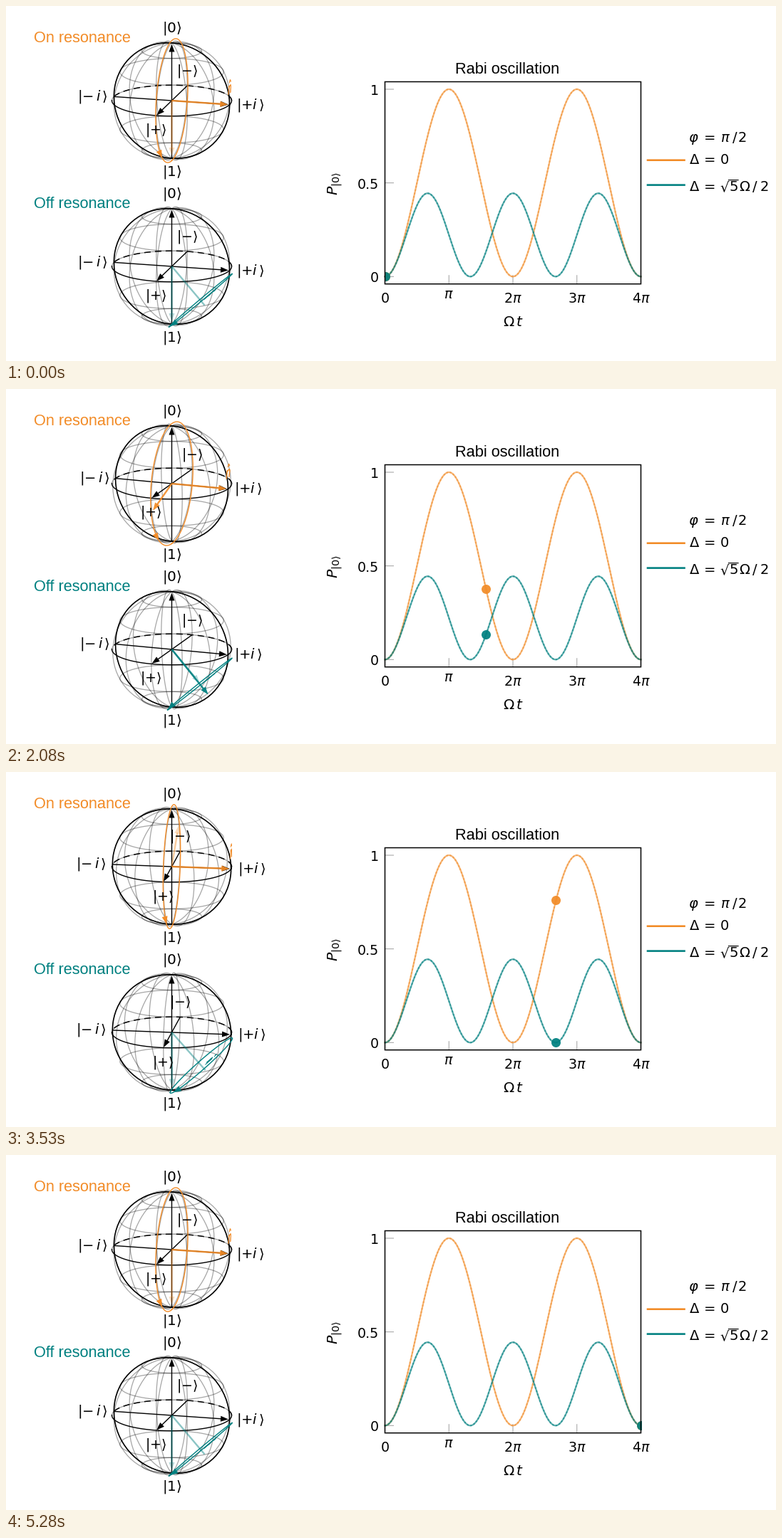
A matplotlib script that plays this animation: 1080x499 px, repeating every 5310 ms.

```python
import numpy as np
import matplotlib.pyplot as plt
from matplotlib.animation import FuncAnimation
from matplotlib.collections import LineCollection
from matplotlib.patches import PathPatch, Polygon, Rectangle
from matplotlib.path import Path
from matplotlib.textpath import TextPath

W, H = 1080, 499
STEPS, FRAMES, LOOP = 190, 192, 5310
PX = 0.72                      # points per pixel at 100 dpi
ORANGE, TEAL, BLACK = "#f28c28", "#008080", "black"
CX, R = 232.5, 84
TILT = np.radians(15)
CIRCLE = np.linspace(0, 2 * np.pi, 73)

fig = plt.figure(figsize=(W / 100, H / 100), dpi=100, facecolor="white")
ax = fig.add_axes([0, 0, 1, 1])
ax.set_xlim(0, W)
ax.set_ylim(H, 0)
ax.axis("off")


def label(x, y, s, size=20, color=BLACK, ha="center", va="center", **kw):
    return ax.text(x, y, s, fontsize=size * PX, color=color, ha=ha, va=va,
                   zorder=9, **kw)


def heading(x, y, s, color=BLACK):
    label(x, y, s, 21.8, color, "left", "baseline", family="Liberation Sans")


def stroke(x, y, color, width, **kw):
    return ax.plot(x, y, color=color, lw=width * PX, snap=False, **kw)[0]


def project(p, phi, cy):
    x, y, z = np.moveaxis(np.asarray(p, float), -1, 0)
    sx = -x * np.sin(phi) + y * np.cos(phi)
    near = x * np.cos(phi) + y * np.sin(phi)
    sy = near * np.sin(TILT) - z * np.cos(TILT)
    return np.stack([CX + R * sx, cy + R * sy], -1)


def depth(p, phi):
    near = p[0] * np.cos(phi) + p[1] * np.sin(phi)
    return near * np.cos(TILT) + p[2] * np.sin(TILT)


def head_points(tip, way, length=11, width=8):
    way = way / np.hypot(*way)
    side = np.array([-way[1], way[0]]) * width / 2
    base = tip - length * way
    return np.array([tip, base + side, base - side])


class Arrow:
    def __init__(self, color, width, z):
        self.line = stroke([], [], color, width, zorder=z, solid_capstyle="butt")
        self.head = Polygon(np.zeros((3, 2)), fc=color, ec="none", zorder=z)
        ax.add_patch(self.head)

    def place(self, start, tip, alpha=1.0, head_alpha=1.0):
        way = tip - start
        end = tip - way / np.hypot(*way) * 10
        self.line.set_data([start[0], end[0]], [start[1], end[1]])
        self.line.set_alpha(alpha)
        self.head.set_xy(head_points(tip, way))
        self.head.set_alpha(head_alpha)


def meridian(lon):
    c, s = np.cos(CIRCLE), np.sin(CIRCLE)
    return np.stack([c * np.cos(lon), c * np.sin(lon), s], -1)


def parallel(lat):
    ring = np.cos(lat)
    return np.stack([ring * np.cos(CIRCLE), ring * np.sin(CIRCLE),
                     np.full_like(CIRCLE, np.sin(lat))], -1)


GRID = [meridian(np.radians(d)) for d in range(0, 180, 30)]
GRID += [parallel(np.radians(d)) for d in (-60, -30, 30, 60)]
X, Y, Z = np.eye(3)

glyph = TextPath((0, 0), r"$\hat{n}$", size=100)
box = glyph.get_extents()
GLYPH = (glyph.vertices - [(box.x0 + box.x1) / 2, (box.y0 + box.y1) / 2]) / 100
GLYPH = GLYPH * [0.36, 0.25]


class Bloch:
    """Sphere with a state precessing about a tilted drive axis."""

    def __init__(self, cy, axis, color):
        self.cy, self.axis = cy, np.array(axis)
        self.mid = self.axis * (self.axis @ -Z)
        self.arm = -Z - self.mid
        self.turn = np.cross(self.axis, self.arm)
        up = -self.arm / np.linalg.norm(self.arm)
        self.sign = (self.axis + 0.31 * Z
                     + GLYPH[:, :1] * -X + GLYPH[:, 1:] * up)

        self.grid = LineCollection([], colors="black", alpha=0.34,
                                   linewidths=1.3 * PX, zorder=1)
        ax.add_collection(self.grid)
        a = np.linspace(0, np.pi, 60)
        ex, ey = CX + R * np.cos(a), R * np.sin(TILT) * np.sin(a)
        stroke(ex, cy - ey, "#999999", 1.2, zorder=2)
        stroke(ex, cy - ey, BLACK, 1.5, zorder=2, linestyle=(0, (6, 4)))
        stroke(ex, cy + ey, BLACK, 1.4, zorder=2)
        self.rim = stroke([], [], BLACK, 1.6, zorder=2)
        self.axes = [Arrow(BLACK, 1.4, 3) for _ in range(3)]
        self.orbit = stroke([], [], color, 1.4, zorder=4)
        self.orbit_head = Polygon(np.zeros((3, 2)), fc=color, ec="none", zorder=5)
        self.mark = PathPatch(Path(np.zeros((2, 2))), fc=color, ec=color,
                              lw=0.5 * PX, zorder=6)
        ax.add_patch(self.orbit_head)
        ax.add_patch(self.mark)
        self.drive = Arrow(color, 2.4, 5)
        self.state = Arrow(color, 2.4, 6)

        label(CX, cy - 102, r"$|0\rangle$")
        label(CX, cy + 100.5, r"$|1\rangle$")
        self.plus = label(0, 0, r"$|{+}\rangle$", 19)
        self.minus = label(0, 0, r"$|{-}\rangle$", 19)
        self.plus_i = label(0, 0, r"$|{+}i\,\rangle$", 19.5, ha="left")
        self.minus_i = label(0, 0, r"$|{-}\,i\,\rangle$", 19.5, ha="right")

    def at(self, angle, grow=1.0):
        c, s = np.cos(angle), np.sin(angle)
        return self.mid + grow * (np.multiply.outer(c, self.arm)
                                  + np.multiply.outer(s, self.turn))

    def vector(self, arrow, p, reach, phi, hidden_head):
        front = depth(p, phi) > 0
        look = (0.9, 0.95) if front else (0.45, hidden_head)
        arrow.place(np.array([CX, self.cy]),
                    project(p * reach, phi, self.cy), *look)

    def update(self, phi, angle):
        def flat(p):
            return project(p, phi, self.cy)

        self.grid.set_segments([flat(g) for g in GRID])
        self.rim.set_data(*flat(meridian(np.pi / 2)).T)
        for arrow, v in zip(self.axes, (X, Y, Z)):
            arrow.place(flat(-v), flat(v * 0.98))

        self.orbit.set_data(*flat(self.at(CIRCLE, 1.04)).T)
        tail, tip = flat(self.at(np.radians([-45, -37]), 1.04))
        self.orbit_head.set_xy(head_points(tip, tip - tail))
        self.mark.set_path(Path(flat(self.sign), glyph.codes))

        self.vector(self.drive, self.axis, 0.97, phi, 0)
        self.vector(self.state, self.at(angle), 0.95, phi, 0.3)

        self.plus.set_position(flat(X) + [-0.5, 20.5])
        self.minus.set_position(flat(-X) - [0, 20.5])
        self.plus_i.set_position(flat(Y) + [9, 0.5])
        self.minus_i.set_position(flat(-Y) - [8.5, 0])


# Population chart
LEFT, RIGHT, TOP, BOTTOM = 531.5, 890.5, 106.5, 390.7


def chart_x(t):
    return LEFT + (RIGHT - LEFT) * t / (4 * np.pi)


def chart_y(p):
    return 380.3 - 263.3 * p


def resonant(t):
    return np.sin(t / 2) ** 2


def detuned(t):
    return 4 / 9 * np.sin(0.75 * t) ** 2


frame = Rectangle((LEFT, TOP), RIGHT - LEFT, BOTTOM - TOP, fc="none",
                  ec=BLACK, lw=1.5 * PX, snap=False, zorder=5)
ax.add_patch(frame)
for p, s in ((0, "0"), (0.5, "0.5"), (1, "1")):
    stroke([LEFT, LEFT + 12], [chart_y(p)] * 2, "#a0a0a0", 1, zorder=1)
    label(523, chart_y(p) + 0.5, s, 19, ha="right", va="center_baseline")
for k, s in enumerate(("0", r"$\pi$", r"$2\pi$", r"$3\pi$", r"$4\pi$")):
    x = chart_x(k * np.pi)
    if 0 < k < 4:
        stroke([x, x], [BOTTOM, BOTTOM - 12], "#a0a0a0", 1, zorder=1)
    label(x, 411 if k == 1 else 417, s, 19, va="baseline")

t = np.linspace(0, 4 * np.pi, 400)
dots = []
for curve, color in ((resonant, ORANGE), (detuned, TEAL)):
    stroke(chart_x(t), chart_y(curve(t)), color, 2.2, alpha=0.65, zorder=3)
    stroke(chart_x(t), chart_y(curve(t)), color, 2.2, alpha=0.5, zorder=3,
           linestyle=(0, (1, 1.2)))
    dot = ax.plot([], [], "o", ms=13 * PX, color=color, mew=0, alpha=0.93,
                  zorder=4)[0]
    dot.set_clip_path(frame)
    dots.append((dot, curve))

heading(630, 95, "Rabi oscillation")
label(711, 444, r"$\Omega\,t$")
label(462, 249.5, r"$P_{|0\rangle}$", 20.5, rotation=90)

# Legend
for y, parts in (
        (191, ((964, r"$\varphi$"), (987, "="), (1009.5, r"$\pi$"),
               (1022, "/"), (1032.5, "2"))),
        (222, ((965.5, r"$\Delta$"), (987, "="), (1008, "0"))),
        (260, ((965.5, r"$\Delta$"), (987, "="), (1008, "\u221a"),
               (1020.5, "5"), (1036, r"$\Omega$"), (1050, "/"), (1063.5, "2")))):
    for x, s in parts:
        label(x, y, s, 19.5, va="baseline")
stroke([1013.5, 1027], [244.6, 244.6], BLACK, 1.2)
stroke([900, 951.5], [216.7, 216.7], ORANGE, 2.6)
stroke([900, 951.5], [251.6, 251.6], TEAL, 2.6)

heading(39, 51, "On resonance", ORANGE)
heading(39, 284, "Off resonance", TEAL)
on = Bloch(133, (0, 1, 0), ORANGE)
off = Bloch(366, (0, 2 / 3, -np.sqrt(5) / 3), TEAL)


def draw(i):
    u = min(i / STEPS, 1)      # the end pose is held briefly
    time = 4 * np.pi * u
    phi = np.radians(15 + 8 * np.sin(2 * np.pi * u))
    on.update(phi, time)
    off.update(phi, 1.5 * time)
    for dot, curve in dots:
        dot.set_data([chart_x(time)], [chart_y(curve(time))])
    return []


anim = FuncAnimation(fig, draw, frames=FRAMES, interval=LOOP / FRAMES,
                     repeat=True, repeat_delay=0, blit=False)
plt.show()
```
